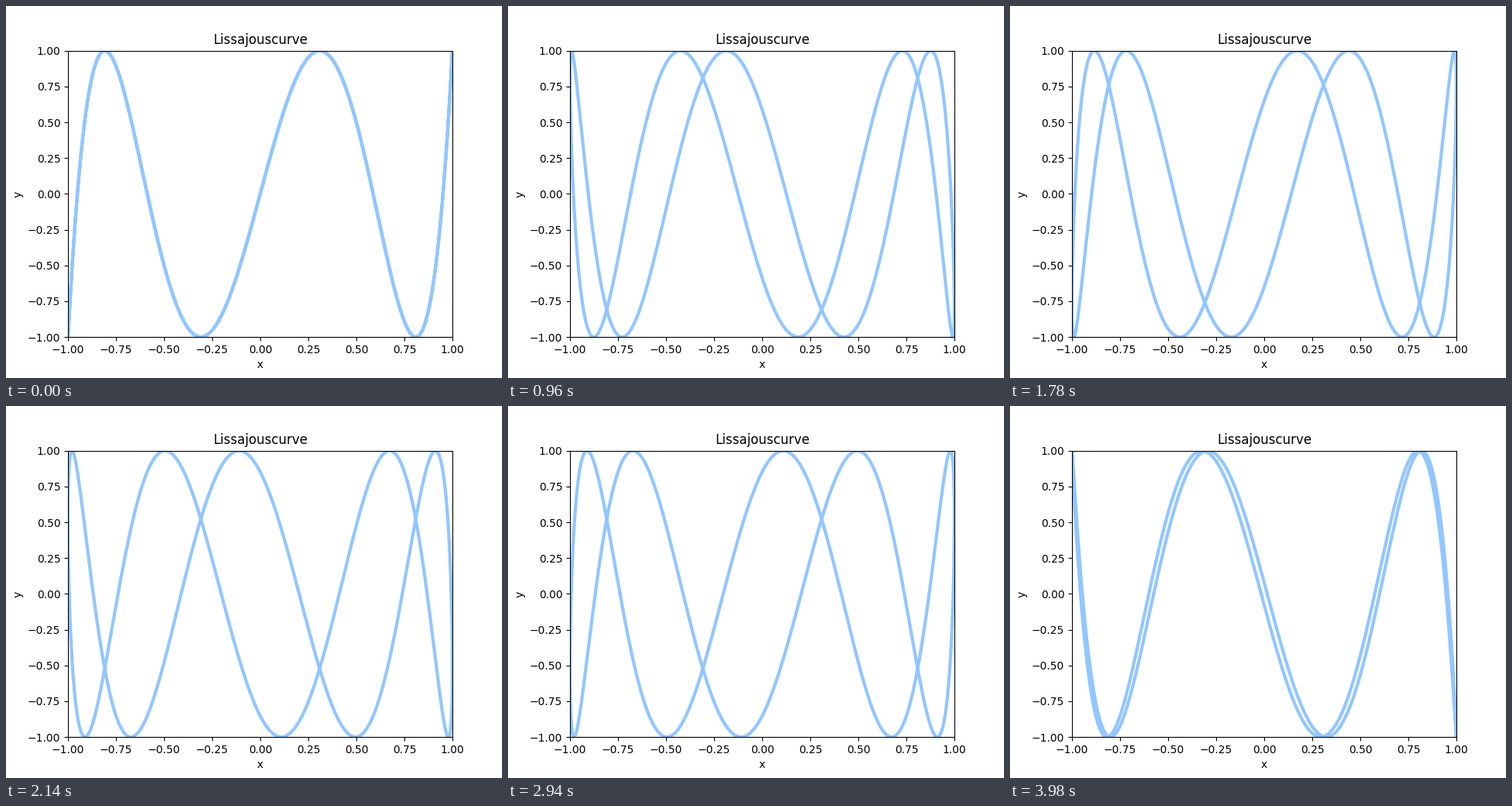
Recreate the animation shown at these times as a matplotlib script. Size 640 px wide and 480 px high, loop 4 s.

```python
import numpy as np
import matplotlib.pyplot as plt
from matplotlib.animation import FuncAnimation

FRAMES = 200
A, B = 1, 5

fig = plt.figure(figsize=(6.4, 4.8), dpi=100)
ax = plt.axes(xlim=(-1, 1), ylim=(-1, 1))
ax.set_title("Lissajouscurve")
ax.set_xlabel("x")
ax.set_ylabel("y")
line, = ax.plot([], [], color="#92C6FF", lw=3)

t = np.linspace(-np.pi, np.pi, 300)
y = np.sin(B * t)


def update(i):
    # the phase advances by half a turn over one loop
    delta = np.pi * i / FRAMES
    line.set_data(np.sin(A * t + delta), y)
    return line,


anim = FuncAnimation(fig, update, frames=FRAMES, interval=20, repeat=True,
                     repeat_delay=0, blit=False)
plt.show()
```
